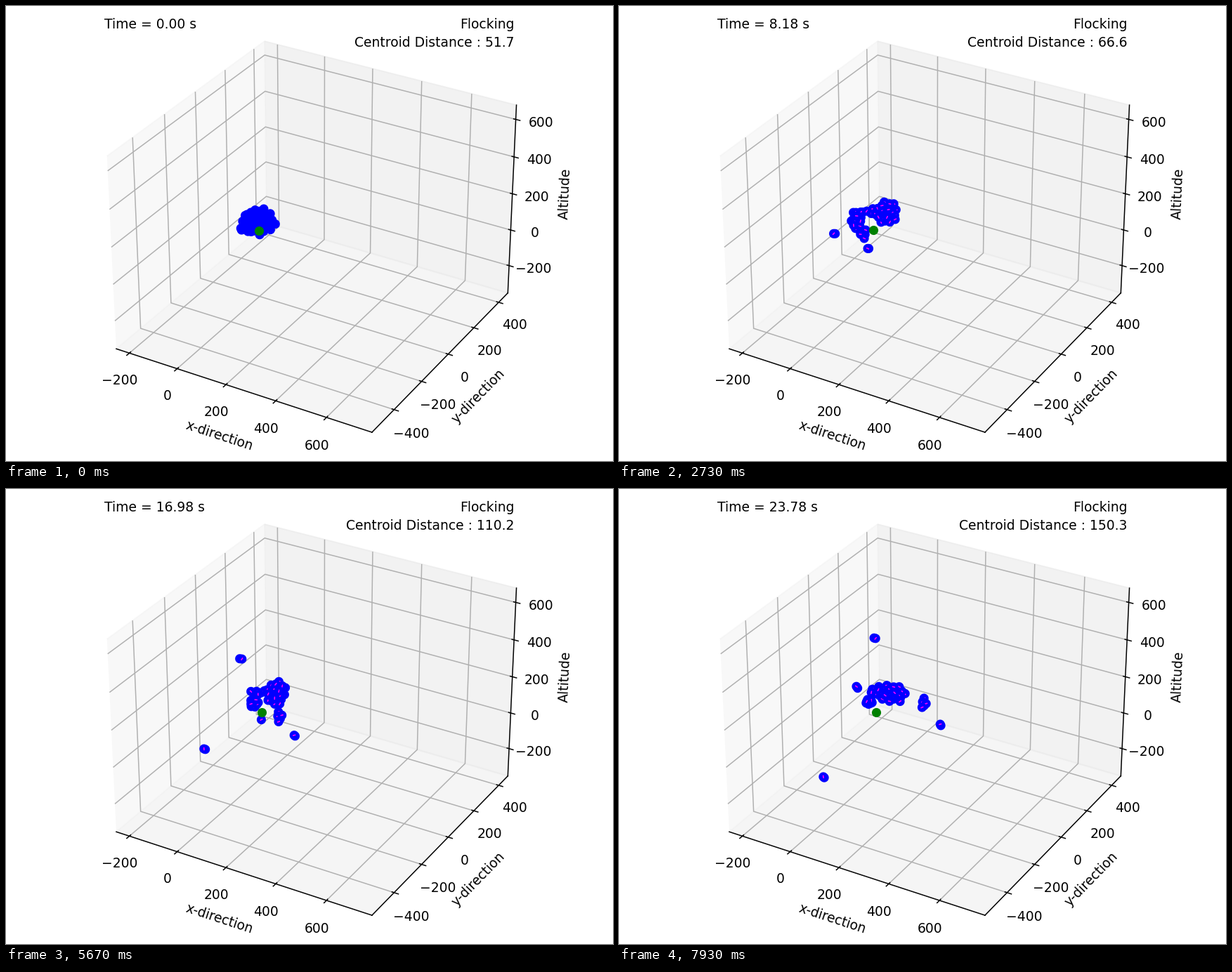
A matplotlib script for the animation above (8 s loop, 864 by 648 pixels).

```python
import numpy as np
import matplotlib.pyplot as plt
from matplotlib.animation import FuncAnimation
from matplotlib.collections import LineCollection

W, H, DPI = 864, 648, 135
FRAMES, INTERVAL = 160, 50
STEPS = 120                      # simulation steps in one loop
t = np.arange(STEPS)


def through(times, values):
    """Smooth curve through a few key values, for every step."""
    v = np.asarray(values, float)
    times = np.asarray(times)
    slope = np.gradient(v, times)
    k = np.clip(np.searchsorted(times, t, side="right") - 1, 0, len(v) - 2)
    span = times[k + 1] - times[k]
    s = (t - times[k]) / span
    return ((1 + 2 * s) * (1 - s) ** 2 * v[k]
            + s * (1 - s) ** 2 * span * slope[k]
            + s * s * (3 - 2 * s) * v[k + 1]
            + s * s * (s - 1) * span * slope[k + 1])


def swarm(count, cx, cy, hw, hh, slant=0):
    """Slowly turning, evenly filled ellipse of birds."""
    paths = []
    for n in range(count):
        radius = np.sqrt((n + 0.5) / (count - 0.5))
        angle = 2.39996 * n + 0.012 * t
        dx = hw * radius * np.cos(angle)
        dy = hh * radius * np.sin(angle) + slant * dx
        paths.append(np.column_stack([cx + dx, cy + dy]))
    return paths


def route(*points):
    xs, ys = zip(*points)
    times = [0, 41, 74, 119]
    return through(times, xs), through(times, ys)


def decay(tau):
    return np.exp(-t / tau)


# Main flock: a breathing core, a left wing that closes in, and a bridge
breath = np.cos(2 * np.pi * t / 60)
tilt = -0.45 * np.exp(-((t - 70) / 15) ** 2)
close = np.clip((t - 40) / 60, 0, 1)
close = close * close * (3 - 2 * close)

birds = swarm(24, 385 - 23 * decay(25), 290 + 18 * decay(30),
              18 + 4.5 * breath, 15.5 - 3 * breath + 7 * decay(10), tilt)
birds += swarm(12, 338 + 18 * close + 8 * decay(10), 309 - 0.05 * t,
               10 - 0.045 * t, 13 - 0.075 * t)
birds += swarm(4, 354 + 0.09 * t, 294 - 0.06 * t, 8, 4)

# Birds that drift away from it
birds += swarm(5, *route((352, 318), (348, 324), (377, 328), (434, 306)),
               4 + 14 * decay(30), 8)
birds += swarm(2, *route((338, 306), (307, 324), (284.5, 358), (292, 410.5)),
               1.5, 1)
birds += swarm(2, *route((350, 305), (336, 294), (330, 253), (365, 212.5)),
               2.5, 0.5)
birds += swarm(2, *route((336, 318), (355, 345), (396.5, 353), (458, 336)),
               1, 1.5)
birds += swarm(2, *route((342, 297), (346, 293), (352, 290.5), (339.5, 282.5)),
               2, 2)
birds += swarm(1, *route((350, 312), (339, 314), (354, 331), (400, 302)),
               0.5, 0.5)

birds = np.random.default_rng(4).permutation(np.array(birds))
heading = np.gradient(birds, axis=1)
heading /= np.linalg.norm(heading, axis=2, keepdims=True) + 1e-9
distance = through([0, 17, 41, 54, 74, 96, 119],
                   [51.7, 52.7, 66.6, 78.3, 97.8, 123.1, 150.3])

fig = plt.figure(figsize=(W / DPI, H / DPI), dpi=DPI)

ax = fig.add_axes([0, 0, 1, 1], projection="3d")
ax.set_xlim(-255.6, 775.6)
ax.set_ylim(-555.6, 475.6)
ax.set_zlim(-355.6, 675.6)
ax.set_xlabel("x-direction")
ax.set_ylabel("y-direction")
ax.set_zlabel("Altitude")
clock = ax.text2D(0.05, 0.95, "", transform=ax.transAxes)
ax.text2D(0.95, 0.95, "Flocking", transform=ax.transAxes, ha="right")
readout = ax.text2D(0.95, 0.91, "", transform=ax.transAxes, ha="right")

# Flat layer in pixel units for the birds
sky = fig.add_axes([0, 0, 1, 1])
sky.set_xlim(0, W)
sky.set_ylim(H, 0)
sky.axis("off")

# Each bird is a round-capped dot followed by its heading dash
marks = LineCollection([], colors=["b", "magenta"], linewidths=[7, 0.9],
                       capstyle="round", zorder=3)
sky.add_collection(marks, autolim=False)
leader, = sky.plot([], [], "go", zorder=4)


def update(frame):
    i = (3 * frame + 2) // 4
    clock.set_text(f"Time = {max(0, 0.2 * i - 0.02):.2f} s")
    readout.set_text(f"Centroid Distance : {distance[i]:.1f}")

    segments = []
    for pos, way in zip(birds[:, i], heading[:, i]):
        segments.append([pos - 0.03, pos + 0.03])
        reach = 1.5 * way
        segments.append([pos - reach, pos + reach])
    marks.set_segments(segments)
    marks.set_color(["b", "magenta" if i else "b"])

    s = i / (STEPS - 1)
    leader.set_data([359.6 + 5.9 * s], [320.4 - 2.9 * s])
    return []


anim = FuncAnimation(fig, update, frames=FRAMES, interval=INTERVAL,
                     repeat=True, repeat_delay=0, blit=False)
plt.show()
```
